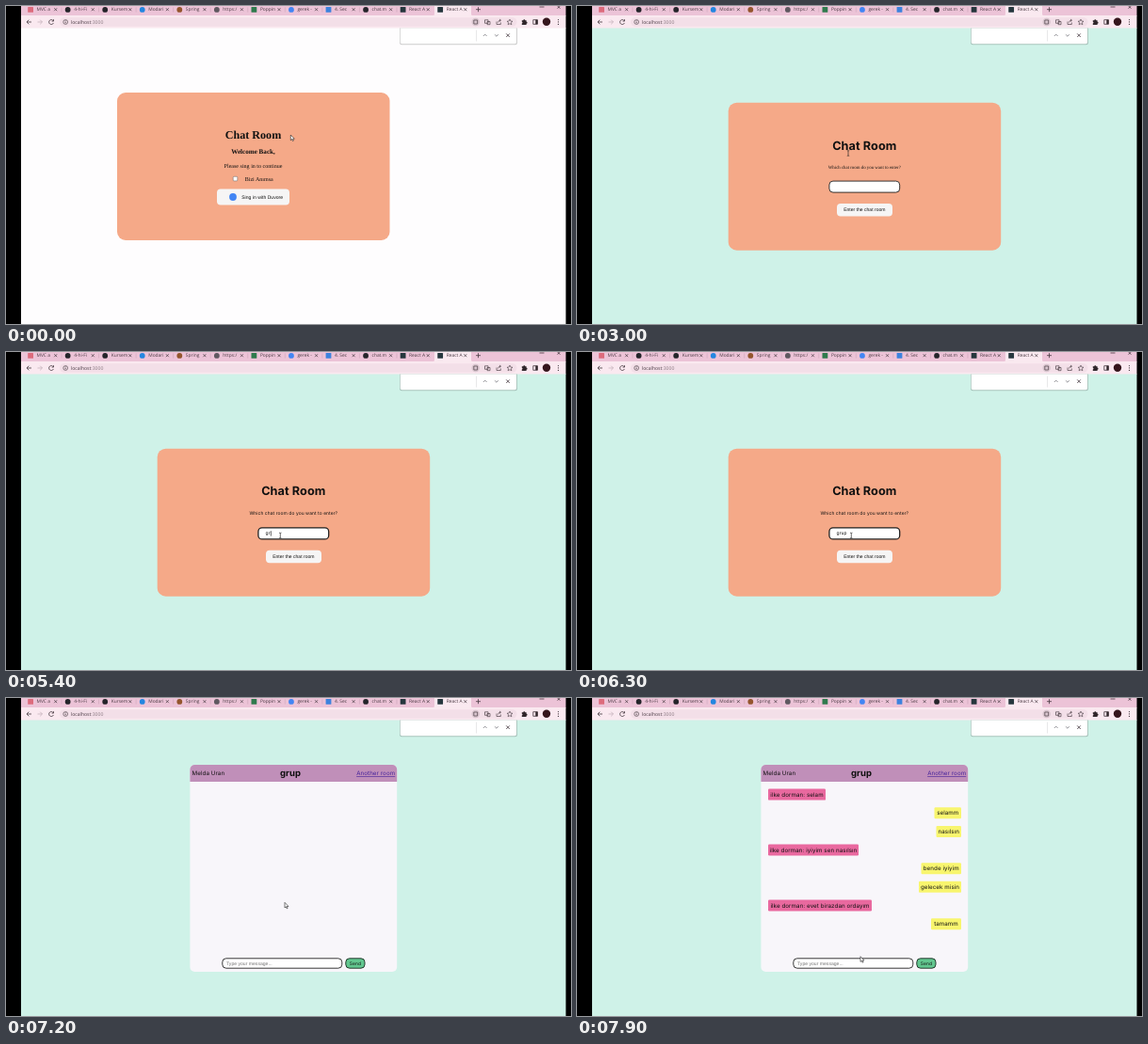
Animation of 600x338 px, one loop 8000 ms. Source, as an HTML page:

```html
<!DOCTYPE html>
<html lang="en">
<head>
<meta charset="utf-8">
<title>Chat Room</title>
<style>
  html, body { margin: 0; width: 100%; height: 100%; overflow: hidden; background: #000; }
  svg { display: block; width: 600px; height: 338px; }
  text { text-rendering: geometricPrecision; white-space: pre; fill: #111; }
  .mid { text-anchor: middle; }
  .ui { font: 4.9px "Open Sans", sans-serif; fill: #4a3a43; }
  .serif { font: 6.05px "Liberation Serif", serif; }
  .arial { font: 5.1px "Liberation Sans", sans-serif; }
  .geo { font: 6.2px Inter, sans-serif; letter-spacing: .08px; }
  .bold { font-weight: 700; }
  .line { fill: none; stroke: #44383f; stroke-width: .8; }
  .card { fill: #f5a988; }
  .btn { fill: #f6f5f5; }
</style>
</head>
<body>
<svg id="stage" viewBox="0 0 600 338">
  <rect width="600" height="338"/>
  <rect id="page" x="16" y="23" width="578.5" height="315" fill="#fefdfe"/>

  <g id="login">
    <rect class="card" x="118" y="92" width="289.5" height="157" rx="9"/>
    <text class="serif bold mid" x="262.5" y="141" style="font-size:12.1px">Chat Room</text>
    <text class="serif bold mid" x="262.5" y="157.3" style="font-size:7.1px">Welcome Back,</text>
    <text class="serif mid" x="262.5" y="172">Please sing in to continue</text>
    <rect x="241.2" y="181.3" width="4.6" height="4.6" rx=".9" fill="#fff" stroke="#77706d" stroke-width=".6"/>
    <text class="serif" x="253.7" y="186">Bizi Anımsa</text>
    <rect class="btn" x="224" y="194.5" width="77" height="17" rx="4"/>
    <circle cx="241" cy="203" r="3.9" fill="#4285f4"/>
    <text class="arial" x="250.2" y="204.8">Sing in with Duvore</text>
  </g>

  <g id="room">
    <rect class="card" x="160.7" y="102.7" width="289.5" height="157" rx="9"/>
    <text id="title" class="geo bold mid" x="305.3" y="151.5" style="font-size:12.7px">Chat Room</text>
    <text id="askSerif" class="serif mid" x="305.3" y="172.6" style="font-size:4.86px">Which chat room do you want to enter?</text>
    <text id="ask" class="geo mid" x="305.3" y="173" style="font-size:4.9px">Which chat room do you want to enter?</text>
    <g id="form">
      <rect id="field" x="267.9" y="186.9" width="74.8" height="12" rx="4" fill="#fff" stroke="#222"/>
      <text id="typed" class="geo" x="275.6" y="194.4" style="font-size:4.9px"></text>
      <rect id="caret" y="190.2" width=".6" height="5.4"/>
      <rect id="enter" class="btn" x="276" y="210.8" width="59" height="13.4" rx="4"/>
      <text class="arial mid" x="305.3" y="219.3" style="font-size:5.05px">Enter the chat room</text>
    </g>
  </g>

  <g id="chat">
    <rect x="195.4" y="71" width="219.8" height="220" rx="5" fill="#f8f6fa"/>
    <path d="M195.4 89V76a5 5 0 0 1 5-5h209.800a5 5 0 0 1 5 5v13z" fill="#c08fb9"/>
    <text class="geo" x="197.600" y="82.200">Melda Uran</text>
    <text class="geo bold mid" x="302" y="83" style="font-size:9.500px">grup</text>
    <text class="geo" x="413.200" y="82.200" text-anchor="end" text-decoration="underline" style="fill:#46239a">Another room</text>
    <g id="messages"></g>
    <rect x="229.800" y="276.800" width="127" height="10.400" rx="4" fill="#fff" stroke="#222" stroke-width=".9"/>
    <text class="arial" x="234" y="283.700" style="fill:#757575">Type your message...</text>
    <rect x="360.800" y="276.800" width="20.200" height="10.400" rx="4" fill="#62c78f" stroke="#1c2b22" stroke-width=".9"/>
    <text class="geo mid" x="370.900" y="283.700" style="font-size:4.900px">Send</text>
  </g>

  <g id="browser">
    <rect x="16" width="578.5" height="10.500" fill="#ecc3d7"/>
    <rect x="16" y="10" width="578.5" height="13.500" fill="#fae9f0"/>
    <path d="M453 10.500q2 0 2-2V0h39v8.500q0 2 2 2z" fill="#fae9f0"/>
    <g id="tabs"></g>
    <path class="line" d="M499 3.700h5M501.500 1.200v5M566.500 1h5M585.500 0l3 2.500m0-2.500l-3 2.500"/>
    <rect x="57" y="12.200" width="485.500" height="9.600" rx="4.800" fill="#f3dfe8"/>
    <path class="line" d="M27 17h-5m2.300-2.300L22 17l2.300 2.300M50.300 15.800a2.500 2.500 0 1 0 .1 2.300M50.500 14.200v1.900h-1.900"/>
    <path class="line" d="M33.500 17h5m-2.300-2.300l2.300 2.300l-2.300 2.300" style="stroke:#c6b2bc"/>
    <circle class="line" cx="63.200" cy="17" r="2.400" style="stroke-width:.6"/>
    <path class="line" d="M63.200 16.600v1.700M63.200 15.400v.6"/>
    <text class="ui" x="69" y="18.800" style="font-size:5.100px">localhost<tspan fill="#8a7982">:3000</tspan></text>
    <circle cx="498.700" cy="17" r="4.200" fill="#d8c5ce"/>
    <path class="line" d="M496.800 15h3.800v4h-3.800zM508.500 14.800h3.500v3.500h-3.500zM511 16.500h3v3.200h-3zM521 16.500v3h4.300v-2M522.500 17.500q.2-2.300 2.800-2.300m-1.300-1.200l1.500 1.200l-1.500 1.300" style="stroke-width:.65"/>
    <path class="line" d="M535 14.100l.9 2 2.100.2-1.600 1.400.5 2.100-1.900-1.100-1.900 1.100.5-2.100-1.600-1.400 2.100-.2z" style="stroke-width:.6"/>
    <path d="M547.800 15.300h1.500a1 1 0 0 1 2 0h1.300v1.400a1 1 0 0 1 0 2v1.200h-4.800v-1.300a1 1 0 0 0 0-1.900z" fill="#30262b"/>
    <path class="line" d="M559.800 14.700h4.600v4.600h-4.600z"/>
    <path d="M562.300 14.700h2.200v4.600h-2.200z" fill="#30262b"/>
    <circle cx="574" cy="16.800" r="4.200" fill="#35151c"/>
    <path d="M586.500 14.500v.1m0 2.300v.1m0 2.300v.1" stroke="#44383f" stroke-width="1.200" stroke-linecap="round"/>
    <path d="M418 23.500h125v15.500q0 2.200-2.200 2.200H420.200q-2.200 0-2.200-2.200z" fill="#000" opacity=".2"/>
    <path d="M418.700 23.500h123.400v15q0 1.800-1.800 1.800h-119.800q-1.800 0-1.800-1.800z" fill="#fff"/>
    <path d="M499.600 25.500v12" stroke="#d3d3d6" stroke-width=".6"/>
    <path class="line" d="M506.800 32l1.900-1.900 1.900 1.900M518.900 30.300l1.900 1.900 1.900-1.900" style="stroke:#77777d"/>
    <path class="line" d="M531.200 29.400l3.600 3.600m0-3.600l-3.600 3.600"/>
  </g>

  <g id="cursor">
    <path id="arrow" d="M0 0v5.700l1.300-1.200.9 2 .9-.4-.9-1.900h1.800z" fill="#fff" stroke="#111" stroke-width=".55"/>
    <path id="beam" d="M-1.200-2.900q1.200 0 1.200.7q0-.7 1.200-.7M0-2.200v4.400M-1.200 2.900q1.200 0 1.200-.7q0 .7 1.200.7" fill="none" stroke="#222" stroke-width=".65"/>
    <path id="hand" d="M-.6.500q.7-.8 1.200 0v2.300l2.200.6q.8.200.7 1l-.5 2.700h-3.300l-2-2.700q.2-.9 1.700.1z" fill="#fff" stroke="#111" stroke-width=".55"/>
  </g>
</svg>

<script>
const $ = id => document.getElementById(id);
const show = (id, on) => { $(id).style.display = on ? "" : "none"; };

function add(parent, tag, attrs, text = "") {
  const el = document.createElementNS("http://www.w3.org/2000/svg", tag);
  for (const key in attrs) el.setAttribute(key, attrs[key]);
  el.textContent = text;
  parent.append(el);
  return el;
}

// label, icon colour, round icon
const tabs = [
  ["MVC a", "#dd6b7c", 0], ["4-hi-Fi", "#24242a", 1], ["Kursem", "#24242a", 1],
  ["Modari", "#2486e0", 1], ["Spring", "#94552d", 1], ["https:/", "#5f5860", 1],
  ["Poppin", "#2f7a4d", 0], ["gerek -", "#4285f4", 1], ["4. Sec", "#3c82de", 0],
  ["chat.m", "#24242a", 1], ["React A", "#25363d", 0], ["React A", "#25363d", 0]
];
tabs.forEach(([label, fill, round], i) => {
  const x = 26 + i * 39.55, g = $("tabs");
  add(g, "rect", { x: x - 2.8, y: 1, width: 5.8, height: 5.8, rx: round ? 2.9 : .6, fill });
  add(g, "text", { x: x + 6.6, y: 5.4, class: "ui" }, label);
  add(g, "path", { d: `M${x + 25.2} 2.200l3 3m0-3l-3 3`, class: "line", style: "stroke-width:.7" });
  if (i < 10) add(g, "path", { d: `M${x + 33} 1.500v5`, stroke: "#c79fb2", "stroke-width": .5 });
});

// text, bubble width, incoming
const messages = [
  ["ilke dorman: selam", 61, 1], ["selamm", 28.5, 0], ["nasılsın", 26.5, 0],
  ["ilke dorman: iyiyim sen nasılsın", 96, 1], ["bende iyiyim", 42.5, 0],
  ["gelecek misin", 45, 0], ["ilke dorman: evet birazdan ordayım", 110, 1], ["tamamm", 32, 0]
];
messages.forEach(([text, width, incoming], i) => {
  const x = incoming ? 203 : 408 - width, y = 96.6 + i * 19.65, g = $("messages");
  add(g, "rect", { x, y, width, height: 12, rx: 1.2, fill: incoming ? "#e9699f" : "#f8f56e" });
  add(g, "text", { x: x + width / 2, y: y + 8.1, class: "geo mid" }, text);
});

// time, x, y, shape
const path = [
  [0, 302.3, 137, "arrow"], [600, 302.3, 137, "arrow"], [1200, 285, 153, "arrow"],
  [2999, 285, 153, "arrow"], [3000, 288, 156.5, "beam"], [4400, 288, 156.5, "beam"],
  [5000, 291, 193, "beam"], [5200, 291, 193, "beam"], [5400, 291.3, 195, "beam"],
  [6600, 291.3, 195, "beam"], [6900, 296, 212, "hand"], [7100, 297.5, 216.5, "hand"],
  [7200, 296, 217.3, "arrow"], [7500, 296, 217.3, "arrow"], [7900, 301, 274.7, "arrow"],
  [8000, 301, 274.7, "arrow"]
];
const typing = [[0, ""], [5300, "g"], [5400, "gr"], [5600, "gru"], [5700, "grup"]];

function moveCursor(t) {
  const i = path.findLastIndex(p => p[0] <= t);
  const a = path[i], b = path[Math.min(i + 1, path.length - 1)];
  const k = b === a ? 0 : (t - a[0]) / (b[0] - a[0]);
  const x = a[1] + (b[1] - a[1]) * k, y = a[2] + (b[2] - a[2]) * k;
  $("cursor").setAttribute("transform", `translate(${x} ${y})`);
  for (const shape of ["arrow", "beam", "hand"]) show(shape, shape === a[3]);
}

function draw(t) {
  const loaded = t >= 3100, focus = t >= 5200, hover = t >= 6900;
  show("login", t < 3000);
  show("room", t >= 3000 && t < 7200);
  show("chat", t >= 7200);
  show("messages", t >= 7300);
  $("page").setAttribute("fill", t < 3000 ? "#fefdfe" : "#cff2e8");

  show("askSerif", !loaded);
  show("ask", loaded);
  $("title").setAttribute("y", loaded ? 151.5 : 152.5);
  $("form").setAttribute("transform", `translate(0 ${loaded ? 0 : -.8})`);
  $("field").setAttribute("stroke-width", focus ? 1.3 : .9);
  $("enter").setAttribute("transform", hover ? "translate(305.500 217.500) scale(1.035) translate(-305.500 -217.500)" : "");

  const text = typing.findLast(s => s[0] <= t)[1];
  if ($("typed").textContent !== text) $("typed").textContent = text;
  show("caret", focus && t < 6200);
  $("caret").setAttribute("x", 275.9 + (text ? $("typed").getComputedTextLength() : 0));
  moveCursor(t);
}

const start = performance.now();
function tick() {
  const t = (performance.now() - start) % 8000;
  draw(Math.floor(t / 100) * 100);
  requestAnimationFrame(tick);
}
tick();
</script>
</body>
</html>
```
